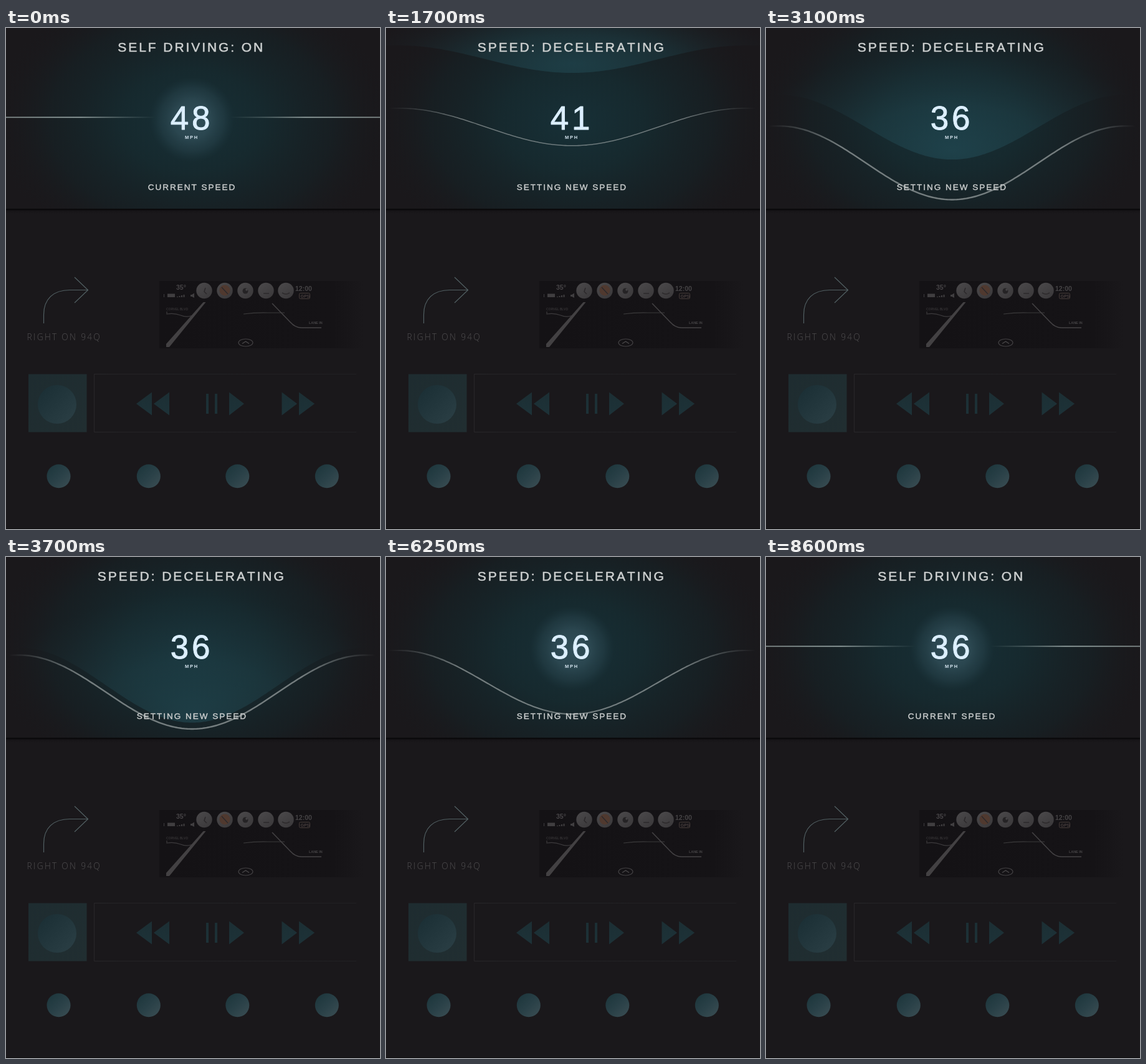
Recreate the animation shown at these times as an HTML page with a canvas. Size 600 by 804 pixels, loop 8650 ms.

```html
<!DOCTYPE html>
<html lang="en">
<head>
<meta charset="utf-8">
<title>Self driving dashboard</title>
<style>
html, body { margin: 0; width: 100%; height: 100%; overflow: hidden; background: #1a181b; }
canvas { display: block; width: 600px; height: 804px; }
</style>
</head>
<body>
<canvas id="stage" width="600" height="804"></canvas>
<script>
const ctx = document.getElementById('stage').getContext('2d');
const LOOP = 8650;
const SANS = '"Liberation Sans", Arial, sans-serif';
const CX = 298.5, HALF = 277, SPLIT = 290;

const clamp = v => Math.min(1, Math.max(0, v));
const smooth = v => (1 - Math.cos(Math.PI * clamp(v))) / 2;

// Linear interpolation over [position, value] pairs.
function track(pos, keys) {
  if (pos <= keys[0][0]) return keys[0][1];
  for (let i = 1; i < keys.length; i++) {
    const [a, from] = keys[i - 1], [b, to] = keys[i];
    if (pos <= b) return from + (to - from) * (pos - a) / (b - a);
  }
  return keys[keys.length - 1][1];
}

// A thin outline gives the lettering a medium weight.
function text(str, x, y, font, color, spacing = 0, outline = 0) {
  ctx.font = font;
  ctx.letterSpacing = spacing + 'px';
  ctx.fontKerning = 'none';
  ctx.fillStyle = color;
  ctx.fillText(str, x, y);
  if (outline) {
    ctx.strokeStyle = color;
    ctx.lineWidth = outline;
    ctx.lineJoin = 'round';
    ctx.strokeText(str, x, y);
  }
}

function poly(points, fill) {
  ctx.beginPath();
  points.forEach(([x, y]) => ctx.lineTo(x, y));
  ctx.closePath();
  ctx.fillStyle = fill;
  ctx.fill();
}

function strokePath(d, color, width = 1) {
  ctx.strokeStyle = color;
  ctx.lineWidth = width;
  ctx.stroke(new Path2D(d));
}

function disc(x, y, r, fill) {
  ctx.beginPath();
  ctx.arc(x, y, r, 0, Math.PI * 2);
  ctx.fillStyle = fill;
  ctx.fill();
}

function linear(x0, y0, x1, y1, stops) {
  const g = ctx.createLinearGradient(x0, y0, x1, y1);
  stops.forEach(([at, color]) => g.addColorStop(at, color));
  return g;
}

// Soft elliptical light, painted over the upper panel.
function light(x, y, rx, ry, stops) {
  ctx.save();
  ctx.translate(x, y);
  ctx.scale(rx, ry);
  const g = ctx.createRadialGradient(0, 0, 0, 0, 0, 1);
  stops.forEach(([at, color]) => g.addColorStop(at, color));
  ctx.fillStyle = g;
  ctx.fillRect(-1, -1, 2, 2);
  ctx.restore();
}

function wave(edge, center) {
  ctx.beginPath();
  for (let x = 0; x <= 600; x += 3) {
    const k = smooth(1 - Math.abs(x - CX) / HALF);
    ctx.lineTo(x, edge + (center - edge) * k);
  }
}

function drawDirections() {
  strokePath('M60.5 474V460C60.5 435 76 420.5 102 420.5H131M110 400L131.5 420.5L110 441', '#526063', 1.2);
  text('RIGHT ON 94Q', 33.5, 501, '300 13.7px "Open Sans", sans-serif', '#525052', 2.3);
}

function drawMap() {
  ctx.fillStyle = linear(246, 0, 575, 0, [[0, '#141215'], [0.85, '#151316'], [1, '#1a181b']]);
  ctx.fillRect(246, 406, 329, 108);
  text('35°', 273, 419.5, 'bold 10.5px ' + SANS, '#474547');
  text('12:00', 464, 421.5, 'bold 10.5px ' + SANS, '#454345');

  [318, 351, 384, 417, 449].forEach(x =>
    disc(x, 421.5, 12.7, linear(x - 9, 410, x + 9, 433, [[0, '#4a484a'], [1, '#3b393b']])));
  disc(351, 421, 8.5, '#50392f');
  strokePath('M320 417L318 423L322 427M346 416L356 427M413 426H422M443 425Q449 429 455 425', '#2d2a2c', 1.6);
  disc(384, 422, 4.5, '#252325');
  disc(386, 420, 1.8, '#474547');

  ctx.fillStyle = '#403e40';
  ctx.fillRect(259, 426.5, 12, 5.5);
  [0, 1, 2, 3].forEach(i => ctx.fillRect(274 + i * 3.5, 431 - i, 2, 1 + i));
  poly([[296, 428], [298, 428], [302, 425.5], [302, 433], [298, 431], [296, 431]], '#403e40');
  ctx.fillRect(253, 427, 1, 5);

  ctx.beginPath();
  ctx.roundRect(470.5, 425.5, 17, 9, 2);
  ctx.strokeStyle = '#473d3a';
  ctx.lineWidth = 1;
  ctx.stroke();
  text('GPS', 472.5, 433, 'bold 7px ' + SANS, '#453c3d');

  poly([[316.5, 440], [320.5, 440], [262, 512], [257, 512], [257, 507]], '#434143');
  strokePath('M258 455V459Q270 457 280 461T298 461.5', '#3d3b3d', 1.2);
  strokePath('M381 459Q400 456.5 420 457H447', '#3b3a3b', 1.2);
  strokePath('M427 442L456 472Q464 481 474 481H506', '#444244', 1.5);
  text('CORVEL BLVD', 257, 453, '5px ' + SANS, '#434143');
  text('LANE IN', 486, 475, 'bold 5.4px ' + SANS, '#474547');
  ctx.beginPath();
  ctx.ellipse(384.5, 505, 11.5, 6, 0, 0, Math.PI * 2);
  ctx.strokeStyle = '#434143';
  ctx.lineWidth = 1.2;
  ctx.stroke();
  strokePath('M379 506.5L384.5 503L390 506.5', '#4b494b', 1.3);
}

function drawPlayer() {
  ctx.fillStyle = linear(36, 555, 130, 649, [[0, '#1e2c30'], [1, '#212e31']]);
  ctx.fillRect(36, 555.5, 93.5, 93);
  disc(82, 604, 31, linear(60, 582, 104, 626, [[0, '#1c3036'], [1, '#293d43']]));
  strokePath('M562 555.5H141.5V648.5H562',
    linear(141, 0, 562, 0, [[0, '#29282b'], [0.1, '#242326'], [1, '#212023']]));

  const color = linear(0, 585, 0, 621, [[0, '#1c2f34'], [1, '#1d3238']]);
  const arrow = (tip, base) => poly([[tip, 603], [base, 584.5], [base, 621.5]], color);
  arrow(209, 234);
  arrow(237, 262);
  arrow(382, 358);
  arrow(467, 442.5);
  arrow(495, 470);
  ctx.fillRect(321, 587, 4, 32);
  ctx.fillRect(335, 587, 4, 32);

  [84.5, 228.8, 371.3, 514.8].forEach(x =>
    disc(x, 719.2, 19, linear(x - 13, 706, x + 13, 733, [[0, '#1f383e'], [0.5, '#294047'], [1, '#364a50']])));
}

function drawLower() {
  ctx.fillStyle = '#1a181b';
  ctx.fillRect(0, SPLIT, 600, 514);
  ctx.fillStyle = linear(0, SPLIT, 0, 298, [[0, '#080809'], [0.25, '#0d0c0e'], [0.45, '#171518'], [1, '#1a181b']]);
  ctx.fillRect(0, SPLIT, 600, 8);
  drawDirections();
  drawMap();
  drawPlayer();
  ctx.fillStyle = '#0c0b0d';
  ctx.fillRect(0, 803, 600, 1);
}

function drawFill(t) {
  const alpha = track(t, [[700, 0], [1300, 0.9], [3100, 1], [3900, 0.9], [4800, 0.75], [6000, 0]]);
  if (!alpha) return;
  const center = track(t, [[700, -15], [1700, 72], [2200, 113], [3100, 211], [3900, 284]]);
  const edge = track(t, [[700, -20], [1700, 28], [2200, 55], [3100, 107], [3900, 158]]);
  ctx.save();
  wave(edge, center);
  ctx.lineTo(600, -60);
  ctx.lineTo(0, -60);
  ctx.clip();
  ctx.globalAlpha = alpha;
  light(CX, center - 15, 340, 70 + center * 0.45,
    [[0, 'rgba(36,80,91,.58)'], [0.45, 'rgba(34,72,81,.42)'], [1, 'rgba(30,50,56,0)']]);
  ctx.restore();
}

function drawLine(t, cruise) {
  if (cruise > 0) {
    ctx.globalAlpha = cruise;
    ctx.fillStyle = linear(0, 0, 600, 0, [
      [0, 'rgba(165,180,178,.75)'], [0.2, 'rgba(185,200,198,.8)'], [0.4, 'rgba(150,170,170,0)'],
      [0.6, 'rgba(150,170,170,0)'], [0.8, 'rgba(185,200,198,.8)'], [1, 'rgba(165,180,178,.75)']]);
    ctx.fillRect(0, 142.5, 600, 1.7);
  }
  if (cruise < 1) {
    const dip = t < 4500 ? smooth((t - 700) / 2500) : 1 - smooth((t - 5550) / 2500);
    const edge = track(dip, [[0, 143], [0.34, 128.5], [0.65, 143], [1, 157.5]]);
    const center = track(dip, [[0, 143], [0.34, 188], [0.65, 230], [1, 276]]);
    ctx.globalAlpha = 1 - cruise;
    wave(edge, center);
    const peak = 0.58 + dip * 0.08;
    ctx.strokeStyle = linear(4, 0, 593, 0, [
      [0, 'rgba(165,172,172,0)'], [0.2, `rgba(165,172,172,${peak})`],
      [0.8, `rgba(165,172,172,${peak})`], [1, 'rgba(165,172,172,0)']]);
    ctx.lineWidth = 1.1 + dip * 1.3;
    ctx.stroke();
  }
  ctx.globalAlpha = 1;
}

function drawGlow(t) {
  const alpha = track(t, [[450, 1], [850, 0], [3900, 0], [4700, 0.85], [5600, 1]]);
  if (!alpha) return;
  const r = track(t, [[0, 68], [3900, 68], [4750, 90], [5800, 68]]);
  ctx.globalAlpha = alpha;
  light(CX, 147, r, r,
    [[0, 'rgba(80,114,128,.48)'], [0.45, 'rgba(70,104,117,.42)'], [0.75, 'rgba(56,88,100,.26)'], [1, 'rgba(40,70,80,0)']]);
  ctx.globalAlpha = 1;
}

function drawLabels(t, cruise) {
  const title = '21px ' + SANS, caption = '13.5px ' + SANS;
  const pair = (alpha, head, hx, foot, fx) => {
    if (alpha <= 0) return;
    ctx.globalAlpha = alpha;
    text(head, hx, 38, title, '#cdd0d0', 2.93, 0.55);
    text(foot, fx, 259.5, caption, '#cdd0d0', 2, 0.4);
    ctx.globalAlpha = 1;
  };
  pair(cruise, 'SELF DRIVING: ON', 179.3, 'CURRENT SPEED', 227.7);
  pair(1 - cruise, 'SPEED: DECELERATING', 146.8, 'SETTING NEW SPEED', 209.7);

  const mph = Math.round(track(t, [[530, 48], [2530, 36]]));
  text(String(mph), 263.8, 163, '53px ' + SANS, '#dcefff', 4.8, 0.9);
  text('MPH', 287, 177.7, 'bold 7.5px ' + SANS, '#d5e4ee', 1.7);
}

function drawUpper(t) {
  const cruise = track(t, [[500, 1], [650, 0], [8150, 0], [8300, 1]]);
  ctx.save();
  ctx.beginPath();
  ctx.rect(0, 0, 600, SPLIT);
  ctx.clip();
  ctx.fillStyle = '#1a181b';
  ctx.fillRect(0, 0, 600, SPLIT);
  light(CX, 150, 325, 235,
    [[0, 'rgba(23,48,55,1)'], [0.35, 'rgba(22,42,47,.95)'], [0.7, 'rgba(22,34,38,.65)'], [1, 'rgba(26,24,27,0)']]);
  drawFill(t);
  drawGlow(t);
  drawLine(t, cruise);
  drawLabels(t, cruise);
  ctx.restore();
}

const start = performance.now();
function tick() {
  drawUpper((performance.now() - start) % LOOP);
  requestAnimationFrame(tick);
}
drawLower();
tick();
</script>
</body>
</html>
```
